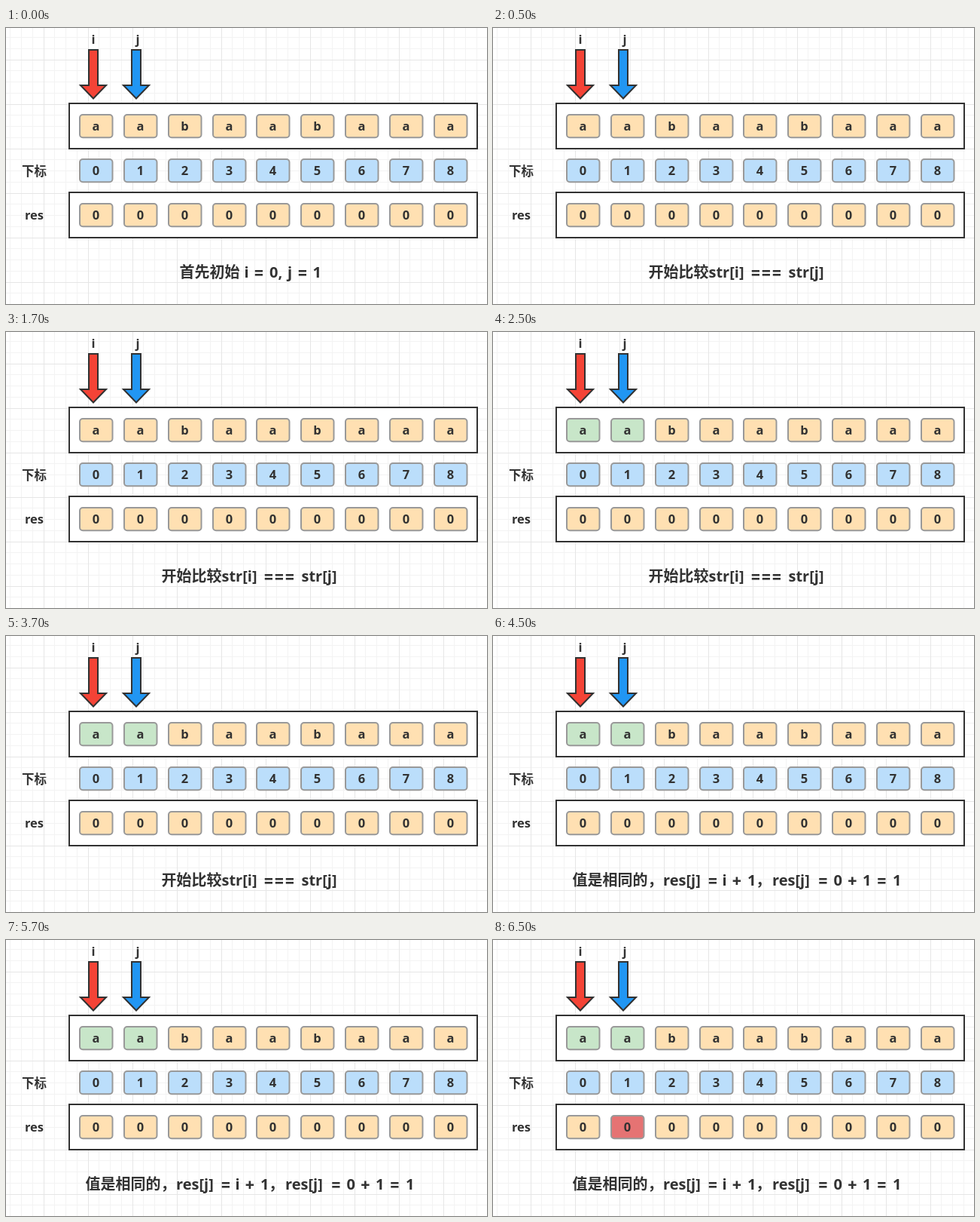
Write an HTML page that moves like this. It is 639 px wide and 366 px high and loops after 8 s.

```html
<!DOCTYPE html>
<html lang="zh">
<head>
<meta charset="utf-8">
<title>next array</title>
<style>
  html, body { margin: 0; width: 100%; height: 100%; overflow: hidden; background: #fff; }
  svg { display: block; width: 100vw; height: 100vh; }
  text { font: 700 16.5px "Open Sans", "Noto Sans CJK SC", "Noto Sans CJK", sans-serif; fill: #323232; }
  .mid { text-anchor: middle; }
  .caption text { font-size: 20px; }
  .caption .op { font-family: Inter, sans-serif; font-size: 21px; }
</style>
</head>
<body>
<svg id="stage" viewBox="0 0 639 366"></svg>
<script>
const stage = document.getElementById('stage');
const INK = '#323232';
const ORANGE = '#ffe0b2', BLUE = '#bbdefb', GREEN = '#c8e6c9', RED = '#e57373';
const LOOP = 8000;

function add(tag, attrs, parent = stage, text = '') {
  const el = document.createElementNS('http://www.w3.org/2000/svg', tag);
  for (const key in attrs) el.setAttribute(key, attrs[key]);
  el.textContent = text;
  parent.append(el);
  return el;
}

function label(text, x, y) {
  add('text', { x, y, class: 'mid' }, stage, text);
}

function drawGrid() {
  const step = 14.75;
  const minor = [], major = [];
  for (let k = -4; k < 44; k++) {
    const x = Math.floor(50 + k * step) + 0.5;
    const y = Math.floor(42 + k * step) + 0.5;
    (k % 4 ? minor : major).push(`M${x} 0V366M0 ${y}H639`);
  }
  add('path', { d: minor.join(''), stroke: '#f3f3f3' });
  add('path', { d: major.join(''), stroke: '#e6e6e6' });
}

function drawArrow(x, fill) {
  add('path', {
    d: `M${x - 6} 29h12v47h11l-17 17.5l-17 -17.5h11z`,
    fill, stroke: INK, 'stroke-width': 2
  });
}

function drawFrame(y) {
  add('rect', { x: 84, y, width: 542, height: 60, fill: '#fff', stroke: INK, 'stroke-width': 2 });
}

function drawRow(values, y, fill) {
  return [...values].map((value, k) => {
    const x = Math.round(97.8 + k * 58.9);
    const cell = add('rect', {
      x, y, width: 43.5, height: 30.3, rx: 4,
      fill, stroke: '#999', 'stroke-width': 2
    });
    label(value, x + 21.5, y + 21);
    return cell;
  });
}

// A caption is a list of words, each with its left edge; operators use their centre.
function makeCaption(words) {
  const group = add('g', { class: 'caption' });
  for (const [text, x] of words) {
    const op = /^[=+]$/.test(text);
    add('text', { x, y: 331, class: op ? 'op mid' : '' }, group, text);
  }
  return group;
}

drawGrid();
drawArrow(116, '#f44336');
drawArrow(173, '#2196f3');
label('i', 116, 21);
label('j', 175, 21);
drawFrame(100);
drawFrame(218);
const chars = drawRow('aabaabaaa', 115, ORANGE);
drawRow('012345678', 174, BLUE);
const res = drawRow('000000000', 233, ORANGE);
label('下标', 37.5, 196);
label('res', 37.5, 254);

const captions = [
  [['首先初始', 230.5], ['i', 316.5], ['=', 336], ['0,', 350], ['j', 374], ['=', 394], ['1', 407.5]],
  [['开始比较', 206.5], ['str[i]', 286.5], ['=', 349], ['=', 363], ['=', 377], ['str[j]', 392.5]],
  [['值是相同的，', 105.5], ['res[j]', 226], ['=', 292], ['i', 304.5], ['+', 324], ['1', 338],
   ['，', 349], ['res[j]', 371], ['=', 438.5], ['0', 452.5], ['+', 477.5], ['1', 491], ['=', 516.5], ['1', 531]]
].map(makeCaption);

const steps = [
  { at: 0, caption: 0 },
  { at: 500, caption: 1 },
  { at: 2500, caption: 1, match: true },
  { at: 4500, caption: 2, match: true },
  { at: 6500, caption: 2, match: true, write: true }
];

function show(step) {
  captions.forEach((c, k) => c.setAttribute('visibility', k === step.caption ? 'visible' : 'hidden'));
  for (const k of [0, 1]) chars[k].setAttribute('fill', step.match ? GREEN : ORANGE);
  res[1].setAttribute('fill', step.write ? RED : ORANGE);
}

const start = performance.now();
function tick() {
  const t = (performance.now() - start) % LOOP;
  show(steps.findLast(step => step.at <= t));
  requestAnimationFrame(tick);
}
tick();
</script>
</body>
</html>
```
